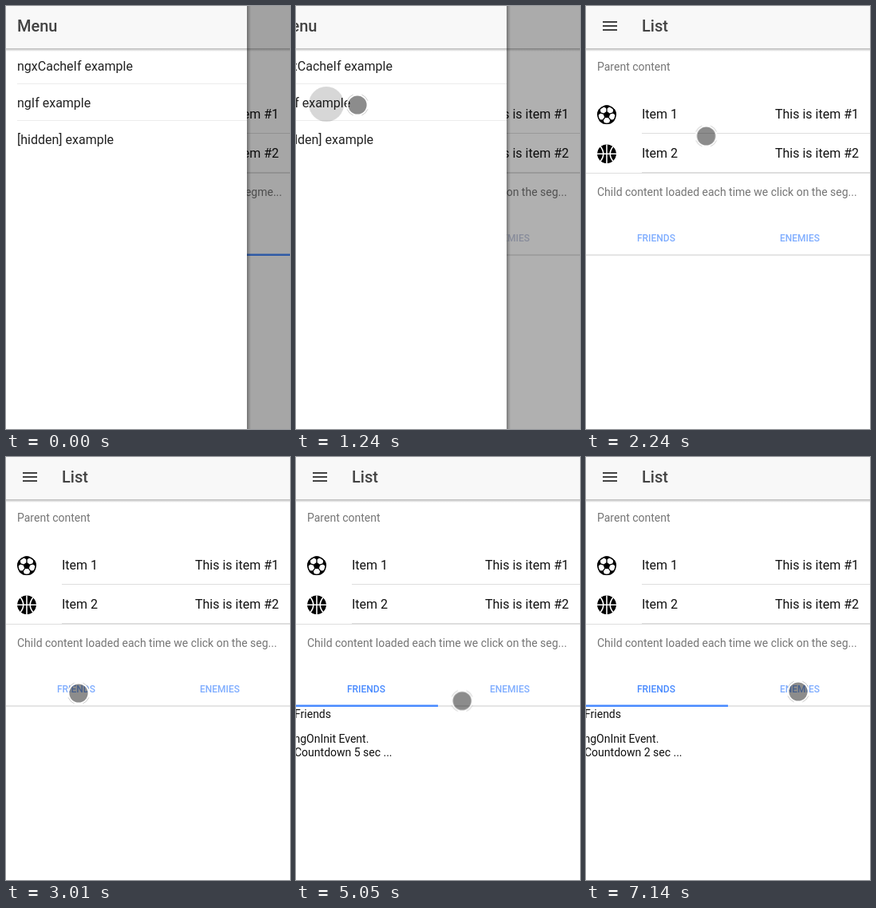
These frames come from a looping animation (356x530 px, 8 s). An HTML page:

```html
<!DOCTYPE html>
<html lang="en">
<head>
<meta charset="utf-8">
<title>List with segments</title>
<style>
  html, body { margin: 0; width: 100%; height: 100%; overflow: hidden; background: #fff; }
  svg { display: block; width: 356px; height: 530px; font-family: Roboto, sans-serif; }

  .title { font-size: 20px; font-weight: 500; fill: #424242; }
  .item { font-size: 16px; fill: #111; }
  .entry { font-size: 16px; fill: #222; }
  .note { font-size: 14px; fill: #757575; }
  .child { font-size: 14px; fill: #111; }
  .tab { font-size: 12px; font-weight: 500; fill: #488aff; }
  .rule { fill: #dedede; }
  .faint { fill: #ececec; }
  .blue { fill: #488aff; }

  /* Hard-cut parts of the 8 s loop */
  .menu, .dim, .ripple, .old, .new, .tab, .friends, .opened, .digits {
    animation: 8s step-end infinite;
  }
  .menu { animation-name: menu; }
  .dim { animation-name: dim; }
  .ripple { animation-name: ripple; transform-origin: 76px 123px; }
  .old { animation-name: old; }
  .new { animation-name: new; }
  .tab { animation-name: tab; }
  .tab.friends { animation-name: friends; }
  .opened { animation-name: opened; }
  .digits { animation-name: count; }
  .cursor { animation: cursor 8s linear infinite; }

  @keyframes menu {
    0% { transform: translateX(0); }
    15.5% { transform: translateX(-38px); }
    16.5% { transform: translateX(-229px); }
    17.5% { transform: translateX(-293px); }
    18.5%, 100% { transform: translateX(-320px); }
  }
  @keyframes dim {
    0% { opacity: .35; }
    15.5% { opacity: .31; }
    16.5% { opacity: .1; }
    17.5% { opacity: .032; }
    18.5%, 100% { opacity: 0; }
  }
  @keyframes ripple {
    0% { opacity: 0; transform: scale(.4); }
    14.625% { opacity: .16; transform: scale(.4); }
    15.5% { opacity: .16; transform: scale(1); }
    16.5% { opacity: .08; transform: scale(1.4); }
    17.5%, 100% { opacity: 0; transform: scale(1.4); }
  }
  @keyframes old { 0% { opacity: 1; } 15.5%, 100% { opacity: 0; } }
  @keyframes new { 0% { opacity: 0; } 15.5%, 100% { opacity: 1; } }
  @keyframes tab {
    0% { fill: #c4cbe0; opacity: 1; }
    16.5%, 100% { fill: #488aff; opacity: .7; }
  }
  @keyframes friends { 0% { opacity: .7; } 52.375%, 100% { opacity: 1; } }
  @keyframes opened { 0% { opacity: 0; } 52.375%, 100% { opacity: 1; } }
  @keyframes count {
    0% { transform: translateY(0); }
    64.25% { transform: translateY(-20px); }
    76.75% { transform: translateY(-40px); }
    89.25%, 100% { transform: translateY(-60px); }
  }

  /* The pointer advances about 13 times a second */
  @keyframes cursor {
    0% { opacity: 0; transform: translate(320px, 518px); animation-timing-function: step-end; }
    2.875% { opacity: 1; transform: translate(320px, 518px); animation-timing-function: steps(3, end); }
    5.768% { transform: translate(175px, 275px); animation-timing-function: steps(4, end); }
    9.625% { transform: translate(77px, 124px); }

    21.375% { transform: translate(77px, 124px); animation-timing-function: steps(3, start); }
    24.24% { transform: translate(92px, 116px); animation-timing-function: steps(3, start); }
    27.1% { transform: translate(138px, 142px); animation-timing-function: steps(3, start); }
    29.97% { transform: translate(176px, 205px); animation-timing-function: steps(2, start); }
    31.875% { transform: translate(181px, 234px); animation-timing-function: steps(4, start); }
    35.7% { transform: translate(128px, 272px); animation-timing-function: steps(3, start); }
    38.59% { transform: translate(91px, 296px); }

    55.375% { transform: translate(91px, 296px); animation-timing-function: steps(1, start); }
    56.35% { transform: translate(95px, 299px); animation-timing-function: steps(5, start); }
    61.1% { transform: translate(165px, 299px); animation-timing-function: steps(5, start); }
    65.875% { transform: translate(237px, 310px); animation-timing-function: steps(4, start); }
    69.8% { transform: translate(241px, 326px); animation-timing-function: steps(4, start); }
    73.7% { transform: translate(232px, 339px); }

    82.5% { transform: translate(232px, 339px); animation-timing-function: steps(4, start); }
    86.35% { transform: translate(247px, 312px); animation-timing-function: steps(4, start); }
    90.2%, 100% { opacity: 1; transform: translate(266px, 294px); }
  }
</style>
</head>
<body>
<svg viewBox="0 0 356 530">
  <defs>
    <linearGradient id="below" x2="0" y2="1">
      <stop stop-opacity=".28"/><stop offset="1" stop-opacity="0"/>
    </linearGradient>
    <linearGradient id="beside">
      <stop stop-opacity=".3"/><stop offset="1" stop-opacity="0"/>
    </linearGradient>
    <clipPath id="ball"><circle r="12"/></clipPath>
    <clipPath id="digit"><rect x="70" y="362" width="13" height="17"/></clipPath>
    <!-- one fifth of the football: seam and edge patch -->
    <g id="fifth">
      <path d="M0-4V-9" stroke="#000" stroke-width="1.3"/>
      <path d="M0-7.6 4-10.2 3.4-13H-3.4L-4-10.2Z"/>
    </g>
  </defs>

  <rect width="356" height="530" fill="#fff"/>

  <!-- page -->
  <rect width="356" height="53" fill="#f8f8f8"/>
  <rect y="53" width="356" height="4" fill="url(#below)"/>
  <path d="M21 20h18M21 25h18M21 30h18" stroke="#424242" stroke-width="2"/>
  <text class="title" x="70" y="32">List</text>
  <text class="note" x="14" y="81">Parent content</text>

  <g transform="translate(26 136.3)" clip-path="url(#ball)">
    <circle r="11.2" fill="#fff" stroke="#000" stroke-width="1.6"/>
    <path d="M0-4.6 4.4-1.4 2.7 3.7H-2.7L-4.4-1.4Z"/>
    <use href="#fifth"/>
    <use href="#fifth" transform="rotate(72)"/>
    <use href="#fifth" transform="rotate(144)"/>
    <use href="#fifth" transform="rotate(216)"/>
    <use href="#fifth" transform="rotate(288)"/>
  </g>
  <text class="item" x="70" y="141">Item 1</text>
  <text class="item" x="237" y="141">This is item #1</text>
  <rect class="rule" x="70" y="159" width="286" height="1"/>

  <g transform="translate(26 185.3)" clip-path="url(#ball)">
    <circle r="12"/>
    <path d="M0-12V12M-12 0H12M-8.5-10Q0 0-8.5 10M8.5-10Q0 0 8.5 10"
          fill="none" stroke="#fff" stroke-width="1.6"/>
  </g>
  <text class="item" x="70" y="190">Item 2</text>
  <text class="item" x="237" y="190">This is item #2</text>
  <rect class="rule" x="70" y="208" width="286" height="1"/>
  <rect class="rule" y="209" width="356" height="1"/>

  <rect y="311" width="356" height="2" fill="#e5e5e5"/>
  <g class="old">
    <text class="note" x="346" y="238" text-anchor="end">content loaded once we click on the segme...</text>
    <rect class="blue" x="178" y="310.5" width="178" height="2.5"/>
  </g>
  <g class="new">
    <text class="note" x="14" y="238">Child content loaded each time we click on the seg...</text>
    <text class="tab friends" x="64" y="295">FRIENDS</text>
    <text class="tab" x="243" y="295">ENEMIES</text>
  </g>

  <g class="opened">
    <rect class="blue" y="310.5" width="178" height="2.5"/>
    <g class="child">
      <text x="-2" y="327">Friends</text>
      <text x="-2.5" y="358">ngOnInit Event.</text>
      <text x="-2" y="375">Countdown</text>
      <text x="84" y="375">sec ...</text>
      <g clip-path="url(#digit)">
        <text class="digits"><tspan x="72.7" y="375">5</tspan><tspan x="72.7" y="395">4</tspan><tspan x="72.7" y="415">3</tspan><tspan x="72.7" y="435">2</tspan></text>
      </g>
    </g>
  </g>

  <rect class="dim" width="356" height="530"/>

  <!-- side menu -->
  <g class="menu">
    <rect x="302" width="5" height="530" fill="url(#beside)"/>
    <rect width="302" height="530" fill="#fff"/>
    <rect width="302" height="53" fill="#f8f8f8"/>
    <rect y="53" width="302" height="4" fill="url(#below)"/>
    <text class="title" x="14" y="32">Menu</text>
    <text class="entry" x="14" y="80.5">ngxCacheIf example</text>
    <rect class="faint" x="14" y="97" width="288" height="1"/>
    <text class="entry" x="14" y="126.5">ngIf example</text>
    <rect class="faint" x="14" y="143" width="288" height="1"/>
    <text class="entry" x="14" y="173">[hidden] example</text>
    <circle class="ripple" cx="76" cy="123" r="22"/>
  </g>

  <!-- pointer -->
  <g class="cursor">
    <circle r="12.6" fill="none" stroke="#fff" stroke-width="2.2"/>
    <circle r="14" fill="none" stroke="#000" stroke-opacity=".25" stroke-width=".8"
            pathLength="8" stroke-dasharray="1" stroke-dashoffset="-.5"/>
    <circle r="11.6" fill-opacity=".45"/>
  </g>
</svg>
</body>
</html>
```
